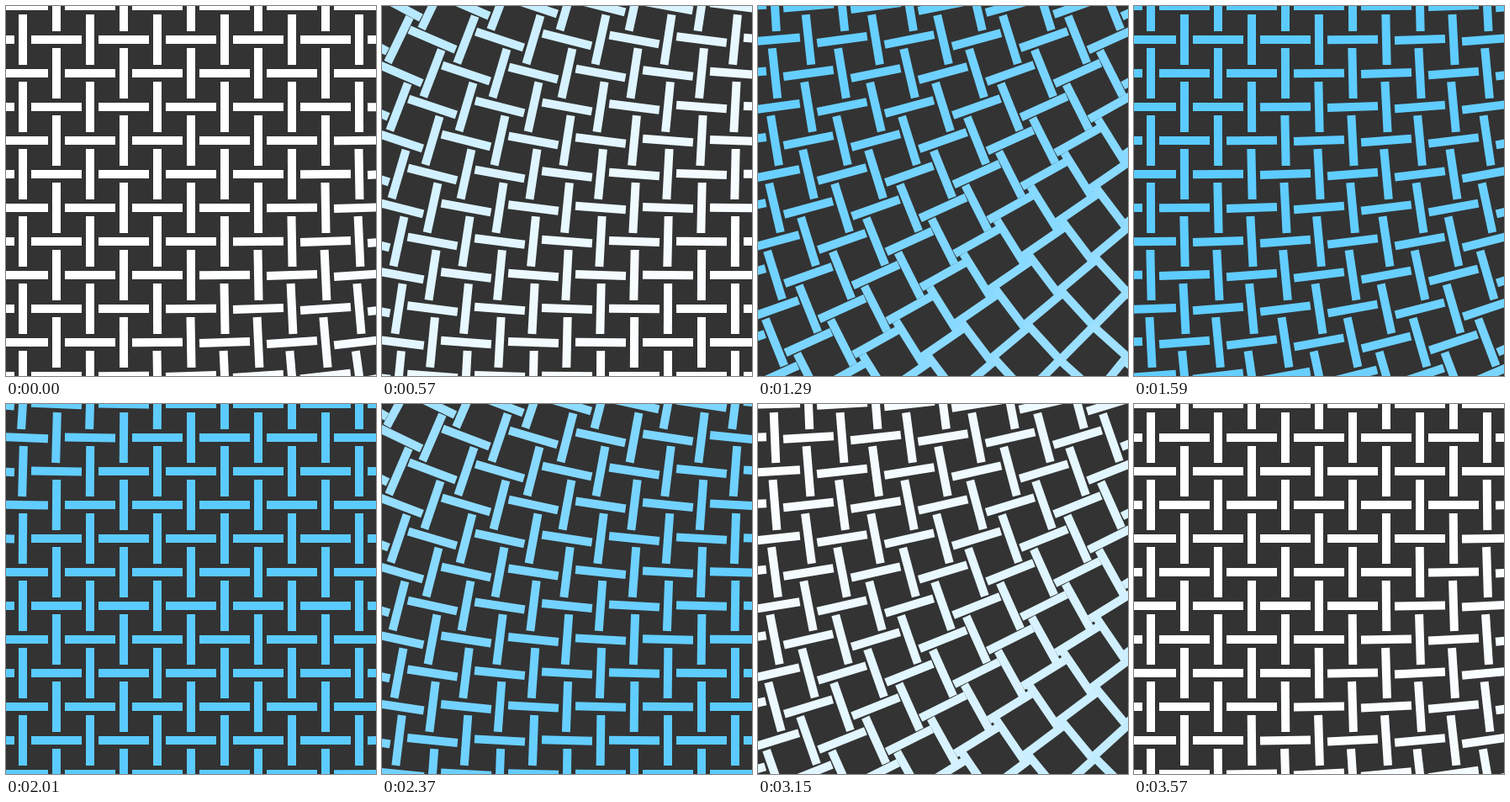
Write an HTML page with a canvas that moves like this. It is 440 px wide and 440 px high and loops after 3600 ms.

```html
<!DOCTYPE html>
<html lang="en">
<head>
<meta charset="utf-8">
<title>Woven grid</title>
<style>
  html, body { margin: 0; width: 100%; height: 100%; overflow: hidden; background: #333; }
  canvas { display: block; width: 440px; height: 440px; }
</style>
</head>
<body>
<canvas id="stage" width="440" height="440"></canvas>
<script>
const ctx = document.getElementById('stage').getContext('2d');
const SIZE = 440, GAP = 40, LONG = 60, THICK = 10;
const LOOP = 3600, HALF = LOOP / 2;
const START = 27, SPEED = 1.4, TURN = 1420;
const WHITE = [255, 255, 255], BLUE = [91, 203, 255];

const smooth = p => p * p * (3 - 2 * p);
const mix = (a, b, k) => `rgb(${a.map((v, i) => Math.round(v + (b[i] - v) * k))})`;

function drawBar(x, y, upright, time) {
  // The wave travels diagonally from the top left corner.
  const local = (time - START - (x + y) / SPEED + 2 * LOOP) % LOOP;
  const wave = Math.floor(local / HALF);
  const turn = smooth(Math.min(1, (local % HALF) / TURN));
  const tint = Math.pow(turn, 0.7);

  ctx.save();
  ctx.translate(x, y);
  ctx.rotate((upright + wave + turn) * Math.PI / 2);
  ctx.fillStyle = wave ? mix(BLUE, WHITE, tint) : mix(WHITE, BLUE, tint);
  ctx.fillRect(-LONG / 2, -THICK / 2, LONG, THICK);
  ctx.restore();
}

function draw(time) {
  ctx.fillStyle = '#333';
  ctx.fillRect(0, 0, SIZE, SIZE);
  for (let j = -1; j <= 12; j++) {
    for (let i = -1; i <= 11; i++) {
      drawBar(20 + i * GAP, j * GAP, Math.abs(i + j) % 2, time);
    }
  }
}

const began = performance.now();
function tick() {
  draw((performance.now() - began) % LOOP);
  requestAnimationFrame(tick);
}
tick();
</script>
</body>
</html>
```
